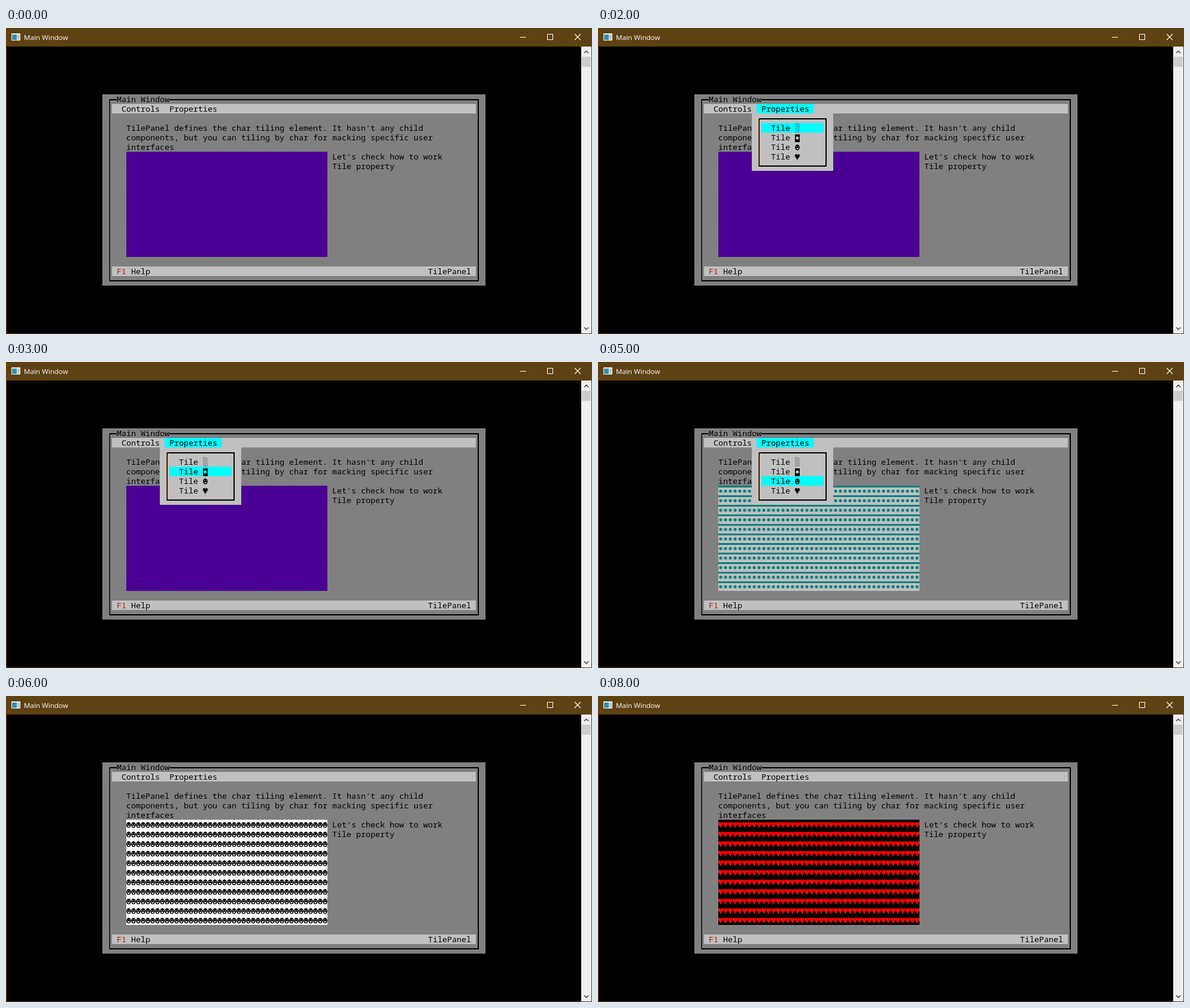
An HTML page with a canvas that plays this animation: 979x512 px, repeating every 9 s.

```html
<!DOCTYPE html>
<html lang="en">
<head>
<meta charset="utf-8">
<title>Main Window</title>
<style>
html, body { margin: 0; width: 100%; height: 100%; overflow: hidden; background: #000; }
canvas { display: block; width: 979px; height: 512px; }
</style>
</head>
<body>
<canvas id="stage" width="979" height="512"></canvas>
<script>
const ctx = document.getElementById('stage').getContext('2d', { alpha: false });
const CW = 8, CH = 16, LOOP = 9000;
const BROWN = '#5f4213', GRAY = '#808080', SILVER = '#c0c0c0', CYAN = '#00ffff';

// One step per second: tile in the panel, highlighted menu, open popup item (-1 = closed)
const steps = [
  { tile: 0, menu: false, item: -1 },
  { tile: 0, menu: true, item: -1 },
  { tile: 0, menu: true, item: 0 },
  { tile: 0, menu: true, item: 1 },
  { tile: 1, menu: false, item: -1 },
  { tile: 1, menu: true, item: 2 },
  { tile: 2, menu: false, item: -1 },
  { tile: 2, menu: true, item: 3 },
  { tile: 3, menu: false, item: -1 }
];

function rect(x, y, w, h, color) {
  ctx.fillStyle = color;
  ctx.fillRect(x, y, w, h);
}

function ellipse(x, y, rx, ry, color) {
  ctx.fillStyle = color;
  ctx.beginPath();
  ctx.ellipse(x, y, rx, ry, 0, 0, Math.PI * 2);
  ctx.fill();
}

function stroke(points, color, width) {
  ctx.strokeStyle = color;
  ctx.lineWidth = width;
  ctx.beginPath();
  points.forEach(([x, y], i) => i ? ctx.lineTo(x, y) : ctx.moveTo(x, y));
  ctx.stroke();
}

// Console text: one glyph per cell
function print(str, x, y, color = '#000') {
  ctx.font = '13.333px "Noto Sans Mono", "DejaVu Sans Mono", monospace';
  ctx.fillStyle = color;
  [...str].forEach((ch, i) => ctx.fillText(ch, x + i * CW, y + 13));
}

function box(x, y, r, b) {
  rect(x, y, r - x + 1, 2, '#000');
  rect(x, b - 1, r - x + 1, 2, '#000');
  rect(r - 1, y, 2, b - y + 1, '#000');
  rect(x, y, 1, b - y + 1, '#000');
  rect(x - 1, y + 1, 1, b - y, '#64400f');
}

function shade(x, y, w, h, color) {
  ctx.fillStyle = color;
  for (let j = 0; j < h; j++)
    for (let i = j % 2 * 2; i < w; i += 4) ctx.fillRect(x + i, y + j, 2, 1);
}

function heart(x, y, color) {
  ctx.fillStyle = color;
  ctx.beginPath();
  ctx.moveTo(x + 4, y + 14);
  ctx.bezierCurveTo(x + 3, y + 11, x, y + 9, x, y + 6.5);
  ctx.bezierCurveTo(x, y + 3.4, x + 3.4, y + 3.2, x + 4, y + 6);
  ctx.bezierCurveTo(x + 4.6, y + 3.2, x + 8, y + 3.4, x + 8, y + 6.5);
  ctx.bezierCurveTo(x + 8, y + 9, x + 5, y + 11, x + 4, y + 14);
  ctx.fill();
}

function face(x, y, fg, bg) {
  ellipse(x + 4, y + 8.8, 3.8, 4.8, fg);
  rect(x + 2, y + 7, 1, 1.5, bg);
  rect(x + 5, y + 7, 1, 1.5, bg);
  rect(x + 2, y + 10, 4, 1, bg);
  rect(x + 3, y + 11, 2, 1, bg);
}

function inverseDot(x, y, fg, bg) {
  rect(x, y + 3, CW, 13, fg);
  ellipse(x + 4, y + 9, 2.6, 2.6, bg);
}

const glyphs = [
  (x, y, fg) => shade(x, y, CW, CH, fg),
  inverseDot,
  face,
  heart
];

const palette = [
  { fg: '#8c009a', bg: '#08008a' },
  { fg: SILVER, bg: '#008080' },
  { fg: '#000', bg: '#fff' },
  { fg: '#ff0000', bg: '#000' }
];

function drawTiles(kind) {
  const { fg, bg } = palette[kind];
  rect(201, 207, 336, 176, bg);
  for (let row = 0; row < 11; row++)
    for (let col = 0; col < 42; col++)
      glyphs[kind](201 + col * CW, 207 + row * CH, fg, bg);
}

function drawWindow() {
  rect(0, 0, 979, 512, BROWN);
  rect(1, 31, 960, 480, '#000');

  rect(9, 9, 15, 12, '#e9eef0');
  rect(10, 11, 8, 9, '#3f8f9e');
  rect(19, 11, 4, 9, '#b9c4c9');

  ctx.font = '11.6px "Open Sans", "Noto Sans", sans-serif';
  ctx.fillStyle = '#fff';
  ctx.fillText('Main Window', 30, 20);

  rect(859, 15, 10, 1, '#fff');
  ctx.strokeStyle = '#fff';
  ctx.lineWidth = 1;
  ctx.strokeRect(904.5, 10.5, 9, 9);
  stroke([[950, 10], [960, 20]], '#fff', 1.1);
  stroke([[960, 10], [950, 20]], '#fff', 1.1);

  rect(961, 31, 17, 480, '#f0f0f0');
  rect(962, 48, 15, 17, '#cdcdcd');
  stroke([[966, 42], [969.5, 38.5], [973, 42]], '#505050', 1.7);
  stroke([[966, 501], [969.5, 504.5], [973, 501]], '#505050', 1.7);
}

function drawPanel(step) {
  rect(161, 111, 640, 320, GRAY);
  box(173, 119, 789, 423);
  rect(185, 111, 88, 16, GRAY);
  print('Main Window', 185, 111);

  rect(177, 127, 608, 16, SILVER);
  if (step.menu) rect(265, 127, 96, 16, CYAN);
  print('Controls', 193, 127);
  print('Properties', 273, 127);

  print("TilePanel defines the char tiling element. It hasn't any child", 201, 159);
  print('components, but you can tiling by char for macking specific user', 201, 175);
  print('interfaces', 201, 191);
  print("Let's check how to work", 545, 207);
  print('Tile property', 545, 223);

  drawTiles(step.tile);

  rect(177, 399, 608, 16, SILVER);
  print('F1', 185, 399, '#9c2c14');
  print('Help', 209, 399);
  print('TilePanel', 705, 399);
}

function drawPopup(active) {
  rect(257, 143, 136, 96, SILVER);
  box(269, 151, 381, 231);
  glyphs.forEach((glyph, i) => {
    const y = 159 + i * CH, bg = i === active ? CYAN : SILVER;
    if (i === active) rect(273, y, 104, CH, CYAN);
    print('Tile', 289, y);
    glyph(329, y, i ? '#000' : 'rgba(0,0,0,0.32)', bg);
  });
}

function frame() {
  const step = steps[Math.floor(performance.now() % LOOP / 1000)];
  drawWindow();
  drawPanel(step);
  if (step.item >= 0) drawPopup(step.item);
  requestAnimationFrame(frame);
}
frame();
</script>
</body>
</html>
```
